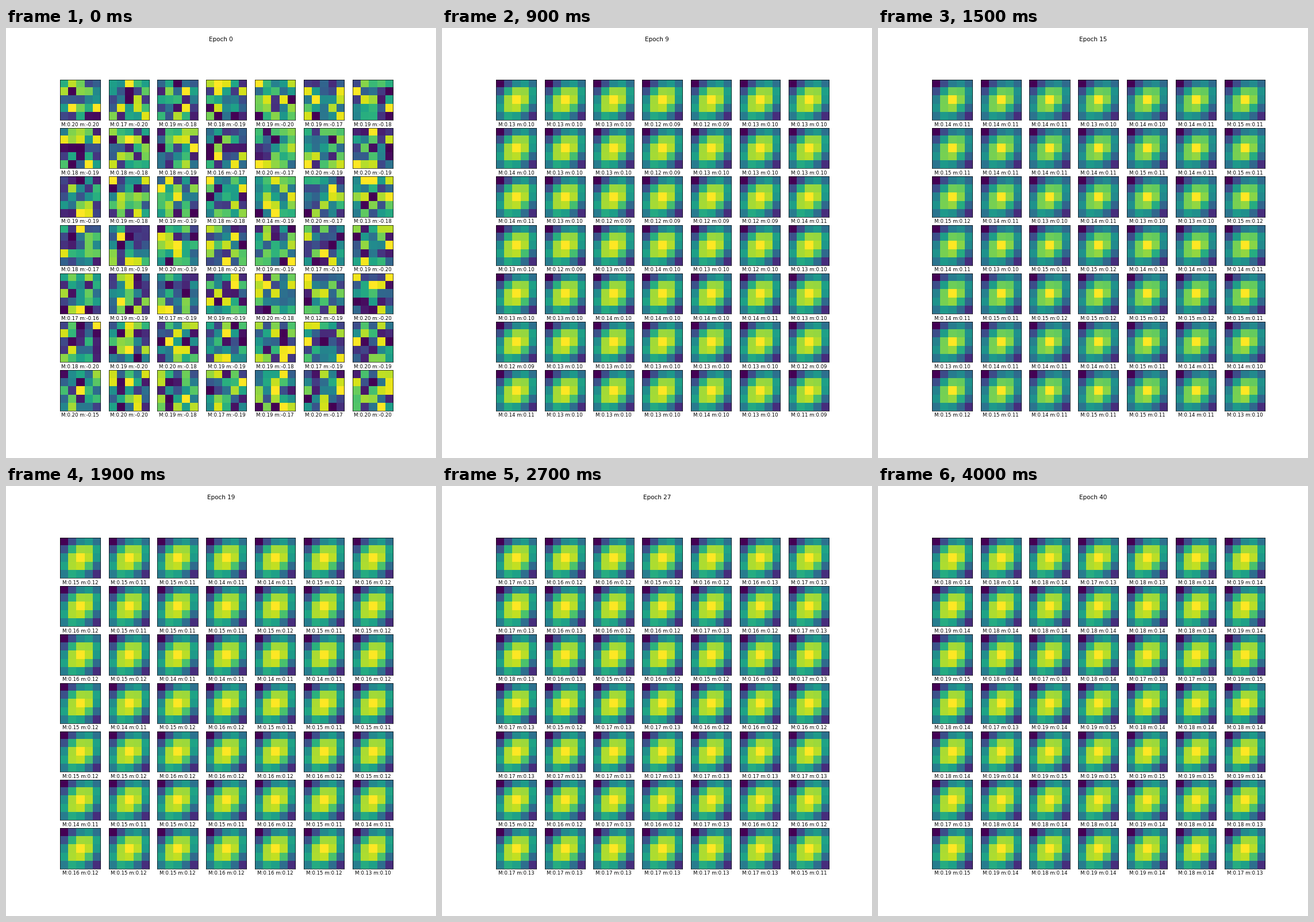
A matplotlib script that plays this animation: 748 px wide and 748 px high, repeating every 4.1 s.

```python
import numpy as np
import matplotlib.pyplot as plt
from matplotlib.animation import FuncAnimation

STAGE, DPI = 748, 64
EPOCHS, STEP_MS = 41, 100
GRID, SIZE = 7, 5
INIT_RANGE = 0.2
NOISE_DECAY = 0.35
MIN_RATIO = 0.766  # smallest weight of a trained kernel relative to its largest

plt.rcParams.update({
    "font.family": "DejaVu Sans",
    "font.size": 9.74,
    "axes.linewidth": 0.78,
})

rng = np.random.default_rng(7)
start = rng.uniform(-INIT_RANGE, INIT_RANGE, (GRID * GRID, SIZE, SIZE))
offset = rng.normal(0, 0.0065, (GRID * GRID, 1, 1))


def diagonal_blob():
    """Smooth hill from 0 to 1, stretched along the rising diagonal."""
    y, x = np.mgrid[:SIZE, :SIZE] - SIZE // 2
    across, along = x + y, x - y
    hill = (1 - 0.094 * across**2 + 0.0022 * across**4 + 0.018 * across
            - 0.038 * along**2 - 0.006 * along)
    return np.clip(hill, 0, 1)


BLOB = diagonal_blob()


def kernels_at(epoch):
    if epoch == 0:
        return start
    # The middle tones waver from epoch to epoch while the weights grow
    waver = -0.3 + 0.5 * np.cos(2 * np.pi * (epoch - 27) / 2.62)
    shape = BLOB + waver * BLOB**3 * (1 - BLOB)
    peak = 0.0808 + 0.016 * np.sqrt(epoch) + offset
    trained = peak * (MIN_RATIO + (1 - MIN_RATIO) * shape)
    return trained + start * NOISE_DECAY**epoch


fig, axes = plt.subplots(GRID, GRID, figsize=(STAGE / DPI, STAGE / DPI), dpi=DPI)
fig.subplots_adjust(left=0.125, right=0.9, bottom=0.11, top=0.88,
                    wspace=0.2, hspace=0.2)
title = fig.suptitle("Epoch 0")
images = []
for ax, kernel in zip(axes.flat, start):
    ax.set(xticks=[], yticks=[])
    images.append(ax.imshow(kernel, cmap="viridis"))


def draw(epoch):
    title.set_text(f"Epoch {epoch}")
    for image, kernel in zip(images, kernels_at(epoch)):
        image.set_data(kernel)
        image.autoscale()
        image.axes.set_xlabel(f"M:{kernel.max():.2f} m:{kernel.min():.2f}")


anim = FuncAnimation(fig, draw, frames=EPOCHS, init_func=lambda: draw(0),
                     interval=STEP_MS, repeat=True, repeat_delay=0)
plt.show()
```
